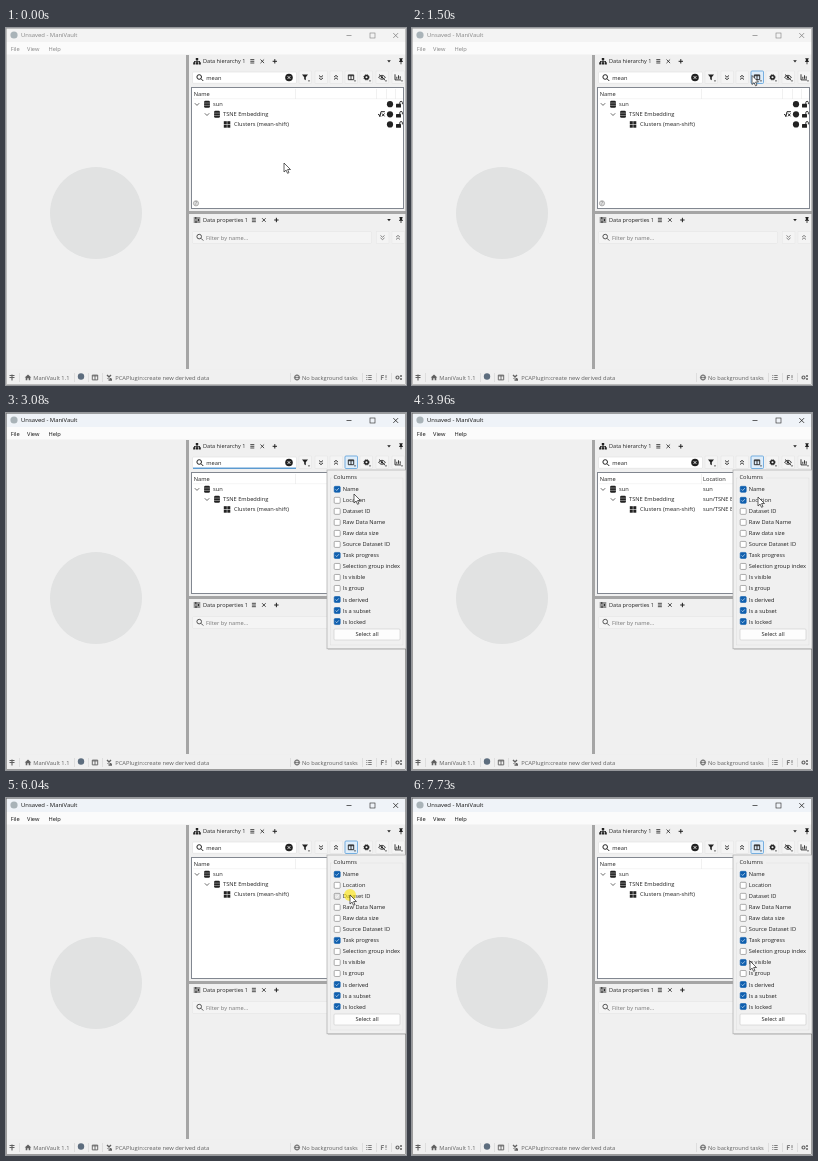
These frames come from a looping animation (400x357 px, 8 s). An HTML page:

```html
<!DOCTYPE html>
<html lang="en">
<head>
<meta charset="utf-8">
<title>Column picker</title>
<style>
html, body { margin: 0; width: 100%; height: 100%; overflow: hidden; background: #f0f0f0; }
svg { display: block; width: 400px; height: 357px; font: 5.7px "Open Sans", "Noto Sans", sans-serif; }
text { white-space: pre; }
</style>
</head>
<body>
<svg id="stage" viewBox="0 0 400 357"></svg>
<script>
const LOOP = 8000;
const INK = '#222';

// Drawing helpers: each returns SVG markup
const rect = (x, y, w, h, fill, more = '') =>
  `<rect x="${x}" y="${y}" width="${w}" height="${h}" fill="${fill}" ${more}/>`;
const text = (x, y, s, fill = INK, more = '') => `<text x="${x}" y="${y + 2}" fill="${fill}" ${more}>${s}</text>`;
const dot = (x, y, r, fill, more = '') => `<circle cx="${x}" cy="${y}" r="${r}" fill="${fill}" ${more}/>`;
const line = (x, y, d, color = INK, w = 0.9) =>
  `<path transform="translate(${x} ${y})" d="${d}" fill="none" stroke="${color}" stroke-width="${w}"/>`;
const shape = (x, y, d, fill = INK) => `<path transform="translate(${x} ${y})" d="${d}" fill="${fill}"/>`;
const group = (id, body, more = '') => `<g id="${id}" ${more}>${body}</g>`;
const outline = color => `stroke="${color}" stroke-width=".6"`;

const burger = (x, y) => line(x, y, 'M-2-1.7H2M-2 0H2M-2 1.7H2', INK, 0.8);
const cross = (x, y, r = 1.8) => line(x, y, `M${-r} ${-r}L${r} ${r}M${r} ${-r}L${-r} ${r}`, INK, 0.8);
const plus = (x, y) => line(x, y, 'M-2.2 0H2.2M0-2.2V2.2', INK, 1);
const lens = (x, y, c) => line(x, y, 'M1 1L3.3 3.3M1.5-.7A2.3 2.3 0 1 1-3.1-.7A2.3 2.3 0 1 1 1.5-.7', c, 1);
const chevrons = (x, y, s, c) =>
  line(x, y, `M-2 ${-2 * s}L0 ${-0.3 * s}L2 ${-2 * s}M-2 ${0.4 * s}L0 ${2.1 * s}L2 ${0.4 * s}`, c, 0.9);
const arrowDown = (x, y) => line(x, y, 'M-2.2-1L0 1.2L2.2-1', '#444', 0.8);
const database = (x, y) =>
  rect(x - 2.9, y - 3.5, 5.8, 7, INK, 'rx="1.3"') + line(x, y, 'M-2.9-1.2H2.9M-2.9 1.2H2.9', '#fff', 0.4);
const table = (x, y, c = INK) => line(x, y, 'M-2.7-2.4H2.7V2.4H-2.7ZM-2.7-1.6H2.7M0-2V2.4', c, 0.9);
const gear = (x, y, c = INK) =>
  dot(x, y, 1.8, 'none', `stroke="${c}" stroke-width="1.5"`) +
  dot(x, y, 2.7, 'none', `stroke="${c}" stroke-width=".8" stroke-dasharray="1.06 1.06"`);
const lock = (x, y) => rect(x - 3, y - 0.4, 5, 3.7, INK, 'rx=".5"') + line(x, y, 'M.8-.2V-1.5A1.3 1.4 0 0 1 3.4-1.5V0');
const pin = (x, y) => shape(x, y, 'M-1.7-3H1.7V-2.3H1.2V0H2V.7H.4V3H-.4V.7H-2V0H-1.2V-2.3H-1.7Z');

const panelTab = (y, icon, title, end) =>
  icon + text(197, y, title, INK, 'font-size="5.55"') + burger(end, y) + cross(end + 10, y) + plus(end + 22.5, y) +
  shape(383, y, 'M-1.8-1H1.8L0 1.2Z') + pin(395, y);

const button = (x, icon) =>
  rect(x - 6, 43, 12.5, 12.5, '#f4f4f4', 'stroke="#e2e2e2" stroke-width=".5"') + icon;
const corner = x => shape(x + 4, 53, 'M-1.1-.5H1.1L0 .7Z');

// Tree rows: indent, vertical centre, label
const rows = [[0, 76.2, 'sun'], [10, 86.3, 'TSNE Embedding'], [20, 96.4, 'Clusters (mean-shift)']];
const treeRow = ([indent, y, label], i) =>
  rect(196 + indent, y - 5, 201 - indent, 10, '#e5f3ff', `id="row${i}"`) +
  (i < 2 ? arrowDown(191 + indent, y) + database(201 + indent, y)
         : [[-3.2, -3.2], [.3, -3.2], [-3.2, .3], [.3, .3]].map(([a, b]) => rect(221 + a, y + b, 3, 3, INK)).join('')) +
  text(207 + indent + (i > 1), y, label) + dot(384, y, 3.1, INK) + lock(393, y);

// Extra tree column that follows a ticked box
const extraColumn = (id, lines) =>
  group(id, lines.map((s, i) => text(291, i ? rows[i - 1][1] : 65.7, s)).join(''), 'clip-path="url(#treeClip)"');

const columns = ['Name', 'Location', 'Dataset ID', 'Raw Data Name', 'Raw data size', 'Source Dataset ID',
  'Task progress', 'Selection group index', 'Is visible', 'Is group', 'Is derived', 'Is a subset', 'Is locked'];
const alwaysOn = [0, 6, 10, 11, 12];
const columnY = i => 76.3 + 11.02 * i;
const checkbox = (label, i) =>
  rect(328.2, columnY(i) - 3, 6, 6, '#fff', `id="box${i}" rx="1" stroke-width=".6"`) +
  line(331.2, columnY(i), 'M-1.6 0L-.5 1.2L1.7-1.2', '#fff', 0.6) + text(336.8, columnY(i), label);

const popup =
  rect(322, 58, 80, 179, '#000', 'opacity=".12"') +
  rect(321, 57, 79, 178.8, '#f0f0f0', 'stroke="#aaa" stroke-width=".7"') +
  rect(324.5, 65, 72.5, 167, 'none', 'stroke="#ddd" stroke-width=".5"') +
  rect(326, 61, 28, 7, '#f0f0f0') + text(327.5, 63.6, 'Columns') +
  columns.map(checkbox).join('') +
  rect(328, 216, 66, 11, '#fdfdfd', 'rx="1" stroke="#ccc" stroke-width=".6"') +
  text(361, 221.3, 'Select all', INK, 'text-anchor="middle"');

const GREY = '#606060';
const status =
  rect(0, 341.5, 400, 15, '#f0f0f0') +
  line(6, 349.5, 'M-2.5-2H2.5M-2.5 0H2.5M0-3V3', GREY, 1.1) +
  shape(22, 349.5, 'M-3.3 0L0-3L3.3 0H2.3V2.8H.7V.8H-.7V2.8H-2.3V0Z', GREY) + text(27.3, 349.5, 'ManiVault 1.1', GREY) +
  dot(75, 348.5, 3.2, '#5d6d7e') + table(89, 349.5, GREY) +
  line(103.5, 349.5, 'M-2.5-2.5L2 2M-1 2.5H2.5M-2 1L1.5-2.5', GREY, 1.4) +
  text(109.2, 349.5, 'PCAPlugin:create new derived data', GREY, 'font-size="5.8"') +
  dot(291, 349.5, 2.6, 'none', 'stroke="#606060" stroke-width=".8"') +
  line(291, 349.5, 'M-2.6 0H2.6M0-2.6C-2-1-2 1 0 2.6C2 1 2-1 0-2.6', GREY, 0.7) +
  text(296, 349.5, 'No background tasks', GREY) +
  line(363, 349.5, 'M-2.7-2H-1.7M-2.7 0H-1.7M-2.7 2H-1.7M-.8-2H2.7M-.8 0H2.7M-.8 2H2.7', GREY, 0.8) +
  line(378, 349.5, 'M-2.6 2.5V-2H0M-2.6 0H-.5M2-2.4V.7M2 1.7V2.5', GREY, 0.8) +
  dot(391.5, 349.5, 1.5, 'none', 'stroke="#606060" stroke-width="1.2"') +
  dot(395, 347.9, 1, GREY) + dot(395, 351.1, 1, GREY) +
  [13, 68, 82, 96, 284, 356, 370, 385].map(x => rect(x, 345, 0.5, 9, '#ccc')).join('');

stage.innerHTML =
  '<clipPath id="treeClip"><rect x="187" y="61" width="133" height="119"/></clipPath>' +
  rect(0, 0, 400, 357, '#f0f0f0') +
  rect(0, 0, 400, 14, '#f3f3f3', 'id="titleBar"') + rect(0, 14, 400, 12.5, '#fbfbfb') +
  dot(8, 7, 3.6, '#a9b3b8') +
  group('windowText',
    '<text x="15" y="9.2" font-size="5.9">Unsaved - ManiVault</text>' +
    [[4.7, 'File'], [21, 'View'], [42.5, 'Help']].map(([x, s]) => `<text x="${x}" y="22.5">${s}</text>`).join('')) +
  group('controls',
    line(343, 7.5, 'M-2.5 0H2.5', INK, 0.7) + rect(364, 5, 5, 5, 'none', outline(INK)) + cross(389.7, 7.5, 2.4)) +
  dot(90, 185, 46, '#e1e2e2') +
  rect(180, 27, 3, 314, '#a5a5a5') + rect(183, 183, 217, 3, '#a5a5a5') +

  panelTab(33.3, shape(191, 33.3, 'M-1.2-3.3H1.2V-1H.4V-.3H3V1H3.8V3.2H1.8V1H2.3V.5H.4V1H1.2V3.2H-1.2V1H-.4V.5H-2.3V1H-1.8V3.2H-3.8V1H-3V-.3H-.4V-1H-1.2Z'),
    'Data hierarchy 1', 246.3) +
  rect(186.5, 44, 104, 11.3, '#fff', 'rx="1" stroke="#ddd" stroke-width=".6"') +
  rect(187, 54.7, 103, 0.9, '#0067c0', 'id="focus"') +
  lens(194, 49.7, INK) + text(200.3, 49.7, 'mean') + dot(283, 49.5, 3.8, INK) + line(283, 49.5, 'M-1.3-1.3L1.3 1.3M1.3-1.3L-1.3 1.3', '#fff', 0.9) +
  button(299, shape(299, 49.3, 'M-3-2.8H3L.8 0V3L-.8 2V0Z') + corner(299)) +
  button(315, chevrons(315, 49.5, 1, INK)) + button(330, chevrons(330, 49.5, -1, INK)) +
  button(345, rect(339, 43, 12.5, 12.5, '#dfedf9', 'id="hot" rx="1" stroke="#5aa0dc" stroke-width=".8"') + table(345, 49.3) + corner(345)) +
  button(360, gear(360.5, 49.3) + corner(360)) +
  button(376, line(376, 49.3, 'M-3.3 0C-1.5-2.6 1.5-2.6 3.3 0C1.5 2.6-1.5 2.6-3.3 0M-3-2.8L3 2.8') + dot(376, 49.3, 1.1, INK) + corner(376)) +
  button(392, line(392, 49.3, 'M-3-3V2.6H3M-1.2 1.5V-.5M.5 1.5V-2M2.2 1.5V-1') + corner(392)) +

  rect(185.5, 59.5, 212, 121, '#fff', 'stroke="#828790"') +
  text(187.8, 65.7, 'Name') + rect(187, 70.7, 210, 0.4, '#e5e5e5') +
  [289.5, 370, 380, 389.5].map(x => rect(x, 61, 0.5, 10, '#e2e2e2')).join('') +
  rows.map(treeRow).join('') +
  line(375.5, 86.3, 'M-3.5.4L-2.6 0L-1.6 2.4L-.5-2.6H3.4M.5-.8L3 2M3-.8L.5 2', INK, 1) +
  extraColumn('locations', ['Location', 'sun', 'sun/TSNE Embedding', 'sun/TSNE Embedding']) +
  extraColumn('ids', ['Dataset ID', '7c1e04b2', 'a93d5f60', '2be8471d']) +
  group('help', dot(190, 175.3, 2.6, '#ddd', 'stroke="#999" stroke-width=".7"') +
    '<text x="190" y="177" font-size="4.6" text-anchor="middle" fill="#777">?</text>') +

  panelTab(192, line(191, 192, 'M-3.3-2H3.3M-3.3 0H3.3M-3.3 2H3.3M-1.2-3V-1M1.5-1V1M-1 1V3', INK, 0.9), 'Data properties 1', 247.9) +
  rect(186.5, 203.5, 179, 12, '#f4f4f4', 'rx="1" stroke="#e6e6e6" stroke-width=".6"') +
  lens(194, 209.3, '#555') + text(200, 209.5, 'Filter by name...', '#777') +
  [376.5, 392].map((x, i) => rect(x - 6, 203.5, 12.5, 12, '#f4f4f4', 'stroke="#e6e6e6" stroke-width=".5"') +
    chevrons(x, 209.5, i ? -1 : 1, '#777')).join('') +
  status +
  rect(0.3, 0.3, 399.4, 356.2, 'none', 'id="frame" stroke="#999" stroke-width=".6"') +
  group('popup', popup) +
  dot(0, 0, 6, '#ffe600', 'id="flash" opacity=".6"') +
  `<path id="cursor" d="M0 0V9L2.1 7.1L3.5 10.3L5 9.6L3.6 6.5H6.5Z" fill="#fff" stroke="#222" stroke-width=".7"/>`;

const $ = id => document.getElementById(id);
const show = (id, on) => $(id).setAttribute('visibility', on ? 'visible' : 'hidden');
const within = (t, [from, to]) => t >= from && t < to;

// Pointer tip: time, x, y
const path = [[0, 278, 135], [330, 278, 135], [810, 310, 92], [1160, 330, 66], [1500, 340, 47.5], [2600, 340, 48],
  [3080, 348, 81], [3420, 346, 84], [4350, 346, 84], [4420, 346, 85], [5000, 346, 85], [5450, 344, 97],
  [6100, 344, 97], [6790, 339, 145], [7180, 336, 167], [7270, 336, 167], [7400, 338, 163], [LOOP, 338, 163]];
const clicks = [[1600, 1720], [3830, 3950], [4750, 5050], [5400, 5570], [6030, 6170], [7600, 7715]];
// Spans in which a box, by its index, is ticked
const ticked = { 1: [3950, 4880], 2: [5450, 6030], 8: [7715, LOOP] };
const OPEN = 1720, ACTIVE = 2050, HELP_OFF = 2255, BLUR = 3830;

function tipAt(t) {
  const i = path.findIndex(p => p[0] > t);
  const [t0, x0, y0] = path[i - 1], [t1, x1, y1] = path[i];
  const k = (t - t0) / (t1 - t0);
  return [x0 + (x1 - x0) * k, y0 + (y1 - y0) * k];
}

function draw(now) {
  const t = now % LOOP, [x, y] = tipAt(t);
  const open = t >= OPEN, active = t >= ACTIVE;
  for (const id of ['cursor', 'flash']) $(id).setAttribute('transform', `translate(${x} ${y})`);
  show('flash', clicks.some(c => within(t, c)));
  show('popup', open);
  show('hot', open || y < 55.5 && x > 339);
  show('focus', within(t, [ACTIVE, BLUR]));
  show('help', t < HELP_OFF);
  show('locations', within(t, ticked[1]));
  show('ids', within(t, ticked[2]));
  $('windowText').setAttribute('fill', active ? '#111' : '#858585');
  $('controls').setAttribute('opacity', active ? 1 : 0.55);
  $('titleBar').setAttribute('fill', active ? '#eff3f8' : '#f3f3f3');
  $('frame').setAttribute('stroke', active ? '#666' : '#999');
  rows.forEach(([, cy], i) => show('row' + i, !open && Math.abs(y - cy) < 5.05));
  columns.forEach((_, i) => {
    const on = alwaysOn.includes(i) || ticked[i] && within(t, ticked[i]);
    const hover = open && Math.abs(y - columnY(i)) < 5.5;
    $('box' + i).setAttribute('fill', on ? '#0f5fae' : hover ? '#e4e4e4' : '#fff');
    $('box' + i).setAttribute('stroke', on ? '#0f5fae' : '#777');
  });
  requestAnimationFrame(() => draw(performance.now()));
}
draw(0);
</script>
</body>
</html>
```
